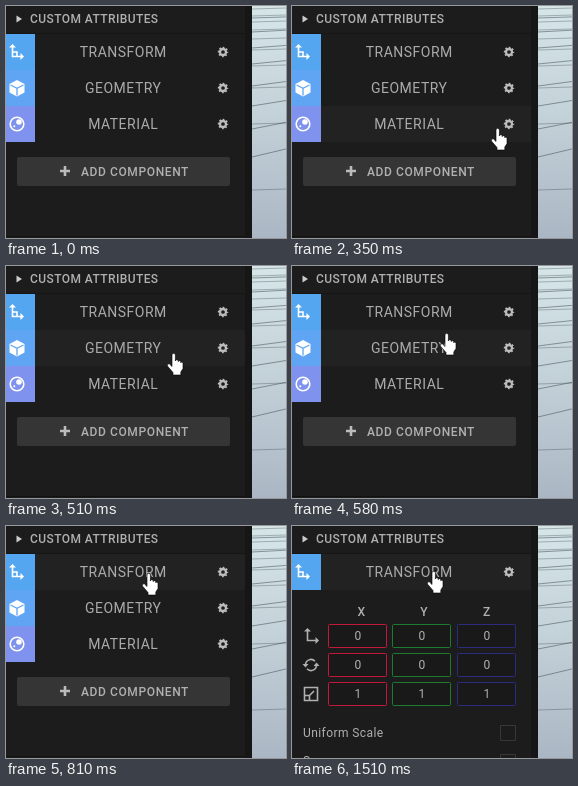
Write an HTML page that moves like this. It is 280 px wide and 232 px high and loops after 2.36 s.

```html
<!DOCTYPE html>
<html lang="en">
<head>
<meta charset="utf-8">
<title>Component panel</title>
<style>
  html, body { margin: 0; width: 100%; height: 100%; overflow: hidden; background: #1c1c1c; }
  svg { display: block; width: 280px; height: 232px; }
  text { font: 400 12px Roboto, sans-serif; letter-spacing: .42px; fill: #b0b0b0; }
  .mid { text-anchor: middle; }
  .row { font-size: 14px; letter-spacing: .5px; fill: #ababab; }
  .strong { font-weight: 500; }
  .line { fill: none; stroke: currentColor; stroke-width: 1.6; }
</style>
</head>
<body>
<svg viewBox="0 0 280 232">
  <defs>
    <linearGradient id="sky" x2="0" y2="1">
      <stop stop-color="#d6e6e8"/>
      <stop offset=".45" stop-color="#c4d2d9"/>
      <stop offset="1" stop-color="#abb6c4"/>
    </linearGradient>
    <g id="gear" fill="none" stroke="#bcbcbc">
      <circle r="3" stroke-width="2.3"/>
      <circle r="4.4" stroke-width="1.6" stroke-dasharray="1.728" stroke-dashoffset=".864"/>
    </g>
    <g id="axes">
      <path class="line" d="M-3.5 -5V4.5H5"/>
      <path fill="currentColor" d="M-7 -4.5L-3.5 -8L0 -4.5ZM4.5 1L8 4.5L4.5 8Z"/>
    </g>
  </defs>

  <rect width="246" height="232" fill="#1c1c1c"/>
  <rect y="27" width="239" height="1" fill="#151515"/>
  <rect id="hover" x="29" width="210" height="36" fill="#222"/>
  <path fill="#ccc" d="M10.5 9.5L16 13L10.5 16.5Z"/>
  <text class="strong" x="24" y="17">CUSTOM ATTRIBUTES</text>

  <g color="#fff">
    <rect y="28" width="29" height="36" fill="#54a6f1"/>
    <use href="#axes" x="10" y="46"/>
    <path class="line" d="M6.5 46H11V50"/>
  </g>
  <text class="row mid" x="117.25" y="51">TRANSFORM</text>
  <use href="#gear" x="217" y="46"/>

  <g id="closed">
    <g color="#fff">
      <rect y="64" width="29" height="36" fill="#60a5f4"/>
      <path fill="#fff" d="M11 74L18.5 78V86.5L11 90.5L3.5 86.5V78Z"/>
      <path fill="none" stroke="#60a5f4" stroke-width="1.3" d="M4.5 79L11 82.3L17.5 79M11 82.3V89.5"/>
      <rect y="100" width="29" height="36" fill="#7f93ee"/>
      <circle class="line" cx="11" cy="118" r="6.8"/>
      <circle cx="13" cy="116" r="2.8" fill="#fff"/>
      <circle cx="8.3" cy="120.2" r="1" fill="#fff"/>
    </g>
    <text class="row mid" x="117.25" y="87">GEOMETRY</text>
    <text class="row mid" x="117.25" y="123">MATERIAL</text>
    <use href="#gear" x="217" y="82"/>
    <use href="#gear" x="217" y="118"/>
    <rect x="11" y="151" width="213" height="29" rx="2" fill="#353535"/>
    <path stroke="#bbb" stroke-width="2.6" d="M54 165H64M59 160V170"/>
    <text class="strong" x="75" y="170" style="letter-spacing:.6px">ADD COMPONENT</text>
    <rect y="230" width="239" height="1" fill="#121212"/>
  </g>

  <g id="opened" color="#b0b0b0">
    <g id="fields"></g>
    <use href="#axes" x="19" y="110"/>
    <path class="line" d="M13.5 139A5.5 5.5 0 0 1 23 135.2M24.5 139A5.5 5.5 0 0 1 15 142.8"/>
    <path fill="currentColor" d="M10.5 138H16.5L13.5 141.5ZM21.5 140H27.5L24.5 136.5Z"/>
    <path class="line" stroke-width="1.4" d="M12.5 161.5H25.5V174.5H12.5ZM12.5 169.5H17.5V174.5M17.5 169.5L22 165"/>
    <text x="11" y="211">Uniform Scale</text>
    <text x="11" y="239">Space</text>
    <path fill="none" stroke="#383838" d="M208.5 199.5h15v15h-15ZM208.5 228.5h15v15h-15Z"/>
  </g>

  <rect x="239" width="7" height="232" fill="#161616"/>
  <rect x="246" width="34" height="232" fill="url(#sky)"/>
  <svg x="246" width="34" height="232" id="grid"></svg>

  <g stroke="#000" fill="#fff" stroke-linejoin="round">
    <path id="arrow" d="M.5 .5V16.5L4.2 13L6.7 18.5L9 17.5L6.6 12H11.5Z"/>
    <path id="hand" stroke-width=".6" d="M5 13.5V2a1.7 1.7 0 0 1 3.4 0V8V7.2q1.5-1 2.9 .2V8.6V8q1.4-.8 2.5 .3V9.8V9.2q1.3-.6 2.2 .6V15.5L13.8 19V22H6V19.5L.4 13Q-.2 10.6 2.3 10.8L5 13.4Z"/>
  </g>
</svg>
<script>
  const LOOP = 2360, OPEN_AT = 1510;
  const $ = id => document.getElementById(id);

  // Pointer steps: time, tip x, tip y
  const steps = [
    [200, 270, 151], [280, 238, 137], [350, 206, 122], [430, 182, 108],
    [500, 168, 87], [580, 155, 67], [660, 147, 53],
    [740, 145, 50], [810, 143, 47], [890, 142, 45]
  ];

  const axes = [['X', 36.5, '#c2183c'], ['Y', 100.5, '#1e7a2e'], ['Z', 165.5, '#2b2b80']];
  $('fields').innerHTML = axes.map(([name, x, color], i) =>
    `<text class="mid strong" x="${69.5 + i * 62.7}" y="90">${name}</text>` +
    [0, 0, 1].map((value, r) => {
      const y = 98.5 + r * 29;
      return `<rect x="${x}" y="${y}" width="58" height="23" rx="1" fill="#191919" stroke="${color}"/>
        <text class="mid" x="${x + 29.5}" y="${y + 15.5}">${value}</text>`;
    }).join('')).join('');

  const gridLine = (y1, y2, alpha) =>
    `<path d="M0 ${y1}L34 ${y2}" stroke="#38454b" stroke-opacity="${alpha}"/>`;
  $('grid').innerHTML =
    [3, 10, 16, 24, 33, 44, 60, 82, 118, 184]
      .map(y => gridLine(y, y - 1, .35)).join('') +
    [12, 26, 42, 58, 80, 100, 123, 151]
      .map(y => gridLine(y, y * .95 - .5, .5)).join('');

  const show = (el, on) => el.setAttribute('visibility', on ? 'visible' : 'hidden');

  function draw() {
    const t = performance.now() % LOOP;
    const step = steps.filter(s => s[0] <= t).pop();
    const [, x, y] = step || [0, -50, -50];
    const row = Math.floor((y - 28) / 36);
    const onRow = x < 230 && row >= 0 && row < 3;

    show($('closed'), t < OPEN_AT);
    show($('opened'), t >= OPEN_AT);
    show($('hover'), onRow);
    $('hover').setAttribute('y', 28 + row * 36);
    show($('hand'), onRow);
    show($('arrow'), step && !onRow);
    $('hand').setAttribute('transform', `translate(${x - 7} ${y})`);
    $('arrow').setAttribute('transform', `translate(${x} ${y})`);
    requestAnimationFrame(draw);
  }
  draw();
</script>
</body>
</html>
```
